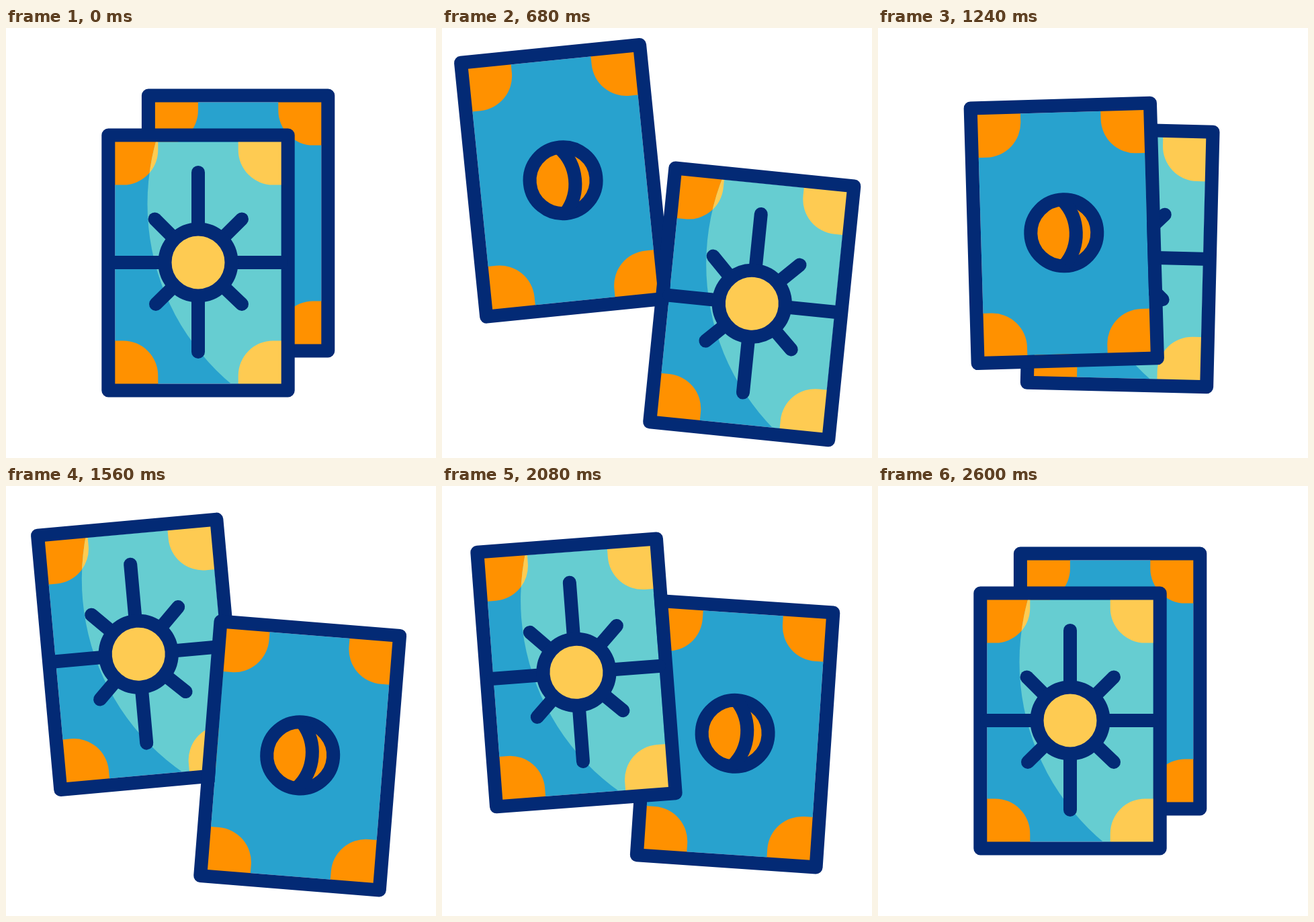
An HTML page with a canvas that plays this animation: 640 px wide and 640 px high, repeating every 3000 ms.

```html
<!DOCTYPE html>
<html lang="en">
<head>
<meta charset="utf-8">
<title>Two cards</title>
<style>
  html, body { margin: 0; height: 100%; overflow: hidden; background: #fff; }
  canvas { display: block; }
</style>
</head>
<body>
<canvas id="stage" width="640" height="640"></canvas>
<script>
const ctx = document.getElementById('stage').getContext('2d');
const LOOP = 3000, STEP = 40;
const NAVY = '#032a75', YELLOW = '#fecb52', ORANGE = '#ff9100', BLUE = '#28a2ce', TEAL = '#66cdd1';
const LEFT = -123.7, TOP = -179.3, WIDTH = 247.4, HEIGHT = 359.8;

// Each segment: start, end and the x handles of its easing curve
const segments = [
  { from: 200, to: 820, x1: 0.33, x2: 0.28 },
  { from: 820, to: 1850, x1: 0.533, x2: 0.362 },
  { from: 1850, to: 2600, x1: 0.37, x2: 0.359 }
];

// Poses are [x, y, degrees]; bows bend each segment's path sideways
const sun = {
  poses: [[286, 348.9, 0], [468.6, 412.3, 6], [167.5, 238.6, -6.28], [286, 348.9, 0]],
  bows: [[8, 4], [5.5, 21], [9.7, 9.7]],
  draw: drawSun
};
const moon = {
  poses: [[345.6, 289.9, 0], [173.2, 224.6, -6], [468.2, 412, 5.63], [345.6, 289.9, 0]],
  bows: [[8, 4], [9.8, 30], [13, 13]],
  draw: drawMoon
};

function ease(p, { x1, x2 }) {
  let low = 0, high = 1;
  for (let i = 0; i < 24; i++) {
    const s = (low + high) / 2, r = 1 - s;
    if (3 * s * r * (r * x1 + s * x2) + s ** 3 < p) low = s; else high = s;
  }
  return low * low * (3 - 2 * low);
}

function poseAt(card, t) {
  const i = t < segments[0].to ? 0 : t < segments[1].to ? 1 : 2;
  const seg = segments[i];
  const p = Math.min(1, Math.max(0, (t - seg.from) / (seg.to - seg.from)));
  if (p === 0 || p === 1) return card.poses[i + p];
  const e = ease(p, seg), [a, b] = card.bows[i];
  const [x, y, angle] = card.poses[i];
  const [dx, dy, turn] = card.poses[i + 1].map((v, k) => v - card.poses[i][k]);
  const bow = 3 * e * (1 - e) * ((1 - e) * a + e * b) / Math.hypot(dx, dy);
  return [x + dx * e - dy * bow, y + dy * e + dx * bow, angle + turn * e];
}

function circle(x, y, r) {
  ctx.beginPath();
  ctx.arc(x, y, r, 0, 2 * Math.PI);
}

function line(x1, y1, x2, y2) {
  ctx.beginPath();
  ctx.moveTo(x1, y1);
  ctx.lineTo(x2, y2);
  ctx.stroke();
}

function face(background, corner) {
  ctx.fillStyle = background;
  ctx.fillRect(LEFT, TOP, WIDTH, HEIGHT);
  ctx.fillStyle = corner;
  for (const x of [LEFT, LEFT + WIDTH])
    for (const y of [TOP, TOP + HEIGHT]) {
      ctx.beginPath();
      ctx.roundRect(x - 64, y - 64, 128, 128, 52);
      ctx.fill();
    }
}

function frame() {
  ctx.strokeStyle = NAVY;
  ctx.lineWidth = 20;
  ctx.lineJoin = 'round';
  ctx.strokeRect(LEFT - 10, TOP - 10, WIDTH + 20, HEIGHT + 20);
}

function disc(color) {
  circle(0, 0, 49.5);
  ctx.fillStyle = color;
  ctx.fill();
  ctx.stroke();
}

function clipped(light) {
  ctx.save();
  ctx.beginPath();
  ctx.rect(LEFT - 1, TOP - 1, WIDTH + 2, HEIGHT + 2);
  ctx.clip();
  face(BLUE, ORANGE);
  if (light) {
    circle(274.5, -87, 350);
    ctx.clip();
    face(TEAL, YELLOW);
  }
  ctx.restore();
}

function drawSun() {
  clipped(true);
  frame();
  ctx.lineCap = 'round';
  line(0, -134, 0, 133);
  line(LEFT, 0, LEFT + WIDTH, 0);
  line(-64.5, -64.5, 0, 0);
  line(65, -64.5, 0, 0);
  line(-63, 62, 0, 0);
  line(65, 62, 0, 0);
  disc(YELLOW);
}

function drawMoon() {
  clipped(false);
  frame();
  disc(ORANGE);
  ctx.lineCap = 'butt';
  ctx.beginPath();
  ctx.arc(-54, 0, 72, -0.73, 0.73);
  ctx.stroke();
}

function render(t) {
  ctx.fillStyle = '#fff';
  ctx.fillRect(0, 0, 640, 640);
  const moonInFront = t >= segments[1].from && t < segments[1].to;
  for (const card of moonInFront ? [sun, moon] : [moon, sun]) {
    const [x, y, angle] = poseAt(card, t);
    ctx.save();
    ctx.translate(x, y);
    ctx.rotate(angle * Math.PI / 180);
    card.draw();
    ctx.restore();
  }
}

const start = performance.now();
function tick() {
  const t = (performance.now() - start) % LOOP;
  render(Math.floor(t / STEP) * STEP);
  requestAnimationFrame(tick);
}
tick();
</script>
</body>
</html>
```
